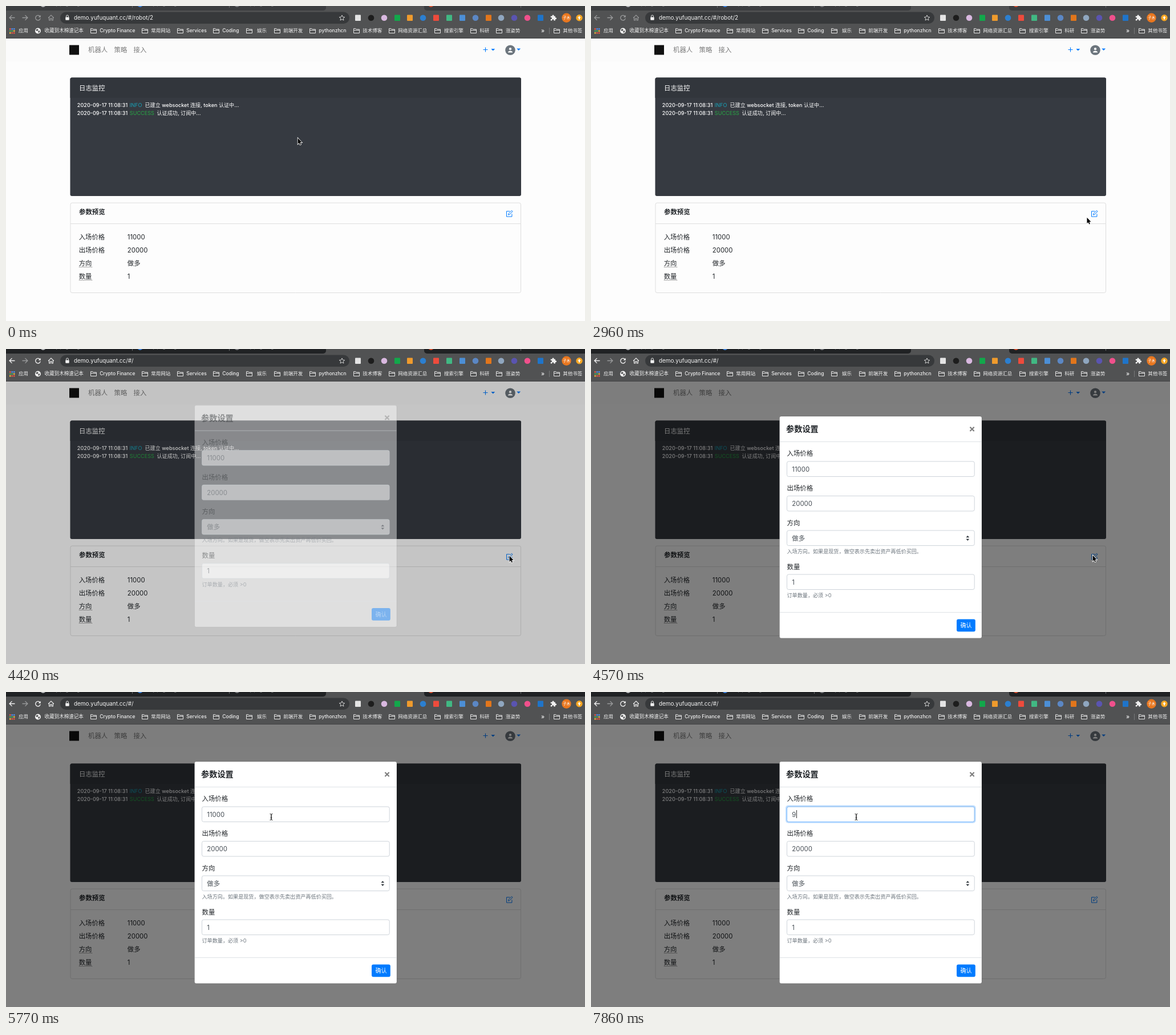
An HTML page with a canvas for the animation above (8000 ms loop, 1015 by 552 pixels).

```html
<!DOCTYPE html>
<html lang="zh-CN">
<head>
<meta charset="utf-8">
<title>Robot settings</title>
<style>
html, body { margin: 0; width: 100%; height: 100%; overflow: hidden; background: #fdfdfd; }
canvas { display: block; }
</style>
</head>
<body>
<canvas id="stage" width="1015" height="552"></canvas>
<script>
const LOOP = 8000, W = 1015, H = 552;
const FONT = 'Inter, "Noto Sans CJK SC", "Noto Sans CJK", sans-serif';
const BLUE = '#007bff', INK = '#212529', PALE = '#f1f1f1';
const ctx = document.getElementById('stage').getContext('2d');

// ---- helpers ----
function text(str, x, cy, size, color, weight = 400, align = 'left') {
  ctx.font = `${weight} ${size}px ${FONT}`;
  ctx.textAlign = align;
  ctx.fillStyle = color;
  ctx.fillText(str, x, cy + size * 0.365);
}
function rect(x, y, w, h, color) {
  ctx.fillStyle = color;
  ctx.fillRect(x, y, w, h);
}
function box(x, y, w, h, r, fill, stroke, width = 1) {
  ctx.beginPath();
  ctx.roundRect(x, y, w, h, r);
  if (fill) { ctx.fillStyle = fill; ctx.fill(); }
  if (stroke) { ctx.strokeStyle = stroke; ctx.lineWidth = width; ctx.stroke(); }
}
function dot(x, y, r, fill, stroke, width = 1) {
  ctx.beginPath();
  ctx.arc(x, y, r, 0, 7);
  if (fill) { ctx.fillStyle = fill; ctx.fill(); }
  if (stroke) { ctx.strokeStyle = stroke; ctx.lineWidth = width; ctx.stroke(); }
}
function line(d, x, y, color, width = 1.3) {
  ctx.save();
  ctx.translate(x, y);
  ctx.strokeStyle = color;
  ctx.lineWidth = width;
  ctx.stroke(new Path2D(d));
  ctx.restore();
}
function shape(d, x, y, color) {
  ctx.save();
  ctx.translate(x, y);
  ctx.fillStyle = color;
  ctx.fill(new Path2D(d));
  ctx.restore();
}

// ---- browser ----
const extensions = [
  [617, 's', '#e4e4e4'], [640, 'c', '#1d1d1d'], [663, 'c', '#d9b8e0'], [686, 's', '#12a84b'],
  [708, 's', '#ef9b2d'], [731, 'c', '#2c7fd0'], [754, 's', '#ee4b3c'], [777, 's', '#41b883'],
  [800, 's', '#4c8fd6'], [823, 'c', '#5b87c4'], [846, 's', '#e2761b'], [868, 'c', '#8fa6bf'],
  [891, 'c', '#5a54b0'], [914, 'c', '#f0508c'], [937, 's', '#1f74c9']
];
const folders = [
  [148, 'Crypto Finance'], [238, '常用网站'], [300, 'Services'], [363, 'Coding'], [421, '娱乐', 440],
  [470, '前端开发'], [532, 'pythonzhcn'], [609, '技术博客'], [671, '网络资源汇总'], [751, '搜索引擎', 768],
  [814, '科研'], [859, '涨姿势', 876], [960, '其他书签']
];

function drawTabs(active) {
  const strip = active ? '#202224' : '#3c3e40';
  rect(0, 0, W, 57, '#515253');
  box(-8, -10, 569, 18, [0, 0, 5, 0], strip);
  box(733, -10, 300, 18, [0, 0, 0, 5], strip);
  for (const x of [221, 391, 902]) rect(x, 0, 1, 3, '#6c6e70');
  dot(65, -3, 5, '#b9bbbd');
  dot(235, -3, 5, '#3b86e8');
  dot(405, -3, 5, '#7b7d80');
  dot(745, -3, 5, '#e0502e');
  for (const x of [80, 250, 420]) text('my page log', x, -4, 8.5, '#8f9193');
}

function drawToolbar(active, url) {
  const on = active ? '#f3f3f3' : '#999a9b';
  line('M5 0H-4.2M0-4.4L-4.4 0L0 4.4', 10.5, 20.5, on);
  line('M-5 0H4.2M0-4.4L4.4 0L0 4.4', 33.5, 20.5, '#999a9b');
  line('M3.6-2.4A4.3 4.3 0 1 0 4.3 0.8', 56, 20.7, on);
  shape('M4.8-5V-1H0.8Z', 56, 20.7, on);
  line('M-5 0.2L0-4.5L5 0.2M-3.4-0.8V4.4H-1.2V1.2H1.2V4.4H3.4V-0.8', 79, 20.6, on, 1.1);

  box(95, 10.5, 507, 20.5, 10.2, '#37393b');
  box(104.3, 19.5, 6.4, 5.3, 0.8, PALE);
  line('M-1.9 0V-1.7A1.9 1.9 0 0 1 1.9-1.7V0', 107.5, 19.6, PALE, 1);
  text(url, 119, 20.8, 9.94, '#f5f5f5', 400);
  line('M0-4.8L1.4-1.6L4.8-1.3L2.2 1L3 4.3L0 2.5L-3 4.3L-2.2 1L-4.8-1.3L-1.4-1.6Z', 589, 20.8, '#dedede', 0.9);

  for (const [x, kind, color] of extensions) {
    if (kind === 's') box(x - 5, 15.5, 10, 10.5, 1, color);
    else dot(x, 20.8, 5.3, color);
  }
  shape('M-4.5-2.8H-1.7A1.6 1.6 0 1 1 1.2-2.8H3.6V0A1.5 1.5 0 1 1 3.6 2.6V5H0.8A1.5 1.5 0 1 0-1.8 5H-4.5V2.2A1.5 1.5 0 1 0-4.5-0.4Z', 959.3, 20.5, PALE);
  dot(982.5, 20.8, 8.2, '#e9771f');
  text('子木', 982.5, 20.8, 6.6, '#fff', 400, 'center');
  dot(1005, 20.8, 5.7, '#f5a623');
  shape('M0-3.2L2.8 0H1V2.8H-1V0H-2.8Z', 1005, 20.8, '#fff');
}

function drawBookmarks() {
  const hues = ['#ea5546', '#f2b53a', '#4aa860', '#4d8df0'];
  for (let i = 0; i < 9; i++) {
    rect(6 + (i % 3) * 3.5, 39 + Math.floor(i / 3) * 3.5, 2.5, 2.5, hues[(i * 3 + (i >> 1)) % 4]);
  }
  text('应用', 22, 43.3, 8.5, PALE);
  dot(56, 43.5, 5, PALE);
  shape('M-4-1.5L-1-3.5L1-1.5L-1 0.3L-2.5 0ZM0.3 0.6L3.4-0.4L3 2.2L0.8 3.6Z', 56, 43.5, '#515253');
  text('收藏到木棉速记本', 67.5, 43.3, 8.55, PALE);
  for (const [x, label, tx] of folders) {
    line('M0.5-4H4L5.2-2.6H10.5V4H0.5ZM0.5-1H10.5', x, 43.5, '#e2e2e2', 1);
    text(label, tx || x + 16.3, 43.3, 8.5, PALE, 500);
  }
  text('»', 938, 43, 10, PALE, 500);
  rect(952, 38, 1, 11, '#77787a');
  rect(0, 56, W, 1, '#434446');
}

// ---- page ----
function caret(x, y) { shape('M-3.4 0H3.4L0 3.5Z', x, y, BLUE); }

function drawPage() {
  rect(0, 57, W, H - 57, '#fdfdfd');
  rect(0, 57, W, 40, '#fbfbfb');
  box(111, 68.5, 17, 17, 0, '#111');
  text('机器人', 144, 77, 11.4, '#7c7c7c');
  text('策略', 189.5, 77, 11.4, '#7c7c7c');
  text('接入', 223.5, 77, 11.4, '#7c7c7c');
  line('M-4 0H4M0-4V4', 840.5, 76.5, BLUE, 1.1);
  caret(853.8, 75);
  dot(884, 77.3, 8.8, '#6c757d');
  dot(884, 75.2, 2.1, '#fff');
  shape('M-4 4.2C-4 0.4 4 0.4 4 4.2Z', 884, 77.2, '#fff');
  caret(898.7, 74.5);

  box(112.5, 125.5, 790.5, 207.5, 3, '#363a41');
  box(112.5, 125.5, 790.5, 35.5, [3, 3, 0, 0], '#32363c');
  text('日志监控', 128, 143.5, 11.4, '#fff', 500);
  logLine(173.7, 'INFO', '#17a2b8', '已建立 websocket 连接, token 认证中...', 243.5);
  logLine(187.3, 'SUCCESS', '#28a745', '认证成功, 订阅中...', 264.5);

  box(113, 345, 789.5, 157.5, 3, '#fdfdfd', '#dedede');
  rect(113, 381, 789, 1, '#dedede');
  text('参数预览', 128, 360.5, 11.4, INK, 600);
  editIcon();
  const rows = [['入场价格', '11000'], ['出场价格', '20000'], ['方向', '做多'], ['数量', '1']];
  rows.forEach(([name, value], i) => {
    const y = 405.3 + i * 22.8;
    text(name, 127.7, y, 11.4, INK);
    text(value, 212.8, y, 11.4, INK);
    if (i > 1) for (let x = 128; x < 151; x += 2) rect(x, Math.round(y + 6), 1, 1, '#555');
  });
}
function logLine(y, level, color, message, x) {
  text('2020-09-17 11:08:31', 124.8, y, 9.1, '#fff', 500);
  text(level, 216.8, y, 9.1, color);
  text(message, x, y, 9.1, '#fff', 500);
}
function editIcon() {
  line('M1-4.6H-4.8V4.8H4.6V0M-1.8 1.8L-1.2-0.8L4.2-6L5.8-4.4L0.6 1Z', 882.3, 364.3, BLUE, 1);
}

// ---- dialog ----
function field(y, value) {
  box(343.5, y, 328.7, 26.5, 3, '#fff', '#ced4da');
  text(value, 352.3, y + 13.4, 11.4, '#495057');
}
function drawDialog(shift, alpha, price, focus, caretOn) {
  ctx.save();
  ctx.globalAlpha = alpha;
  ctx.translate(0, shift);
  box(330.5, 122, 354.5, 388.7, 3, '#fff', 'rgba(0,0,0,.2)', 0.7);
  rect(331, 166, 353.5, 1, '#dee2e6');
  rect(331, 465, 353.5, 1, '#dee2e6');
  text('参数设置', 342, 144, 14.2, INK, 600);
  text('×', 668, 143.5, 17, '#7f7f7f', 700, 'center');

  text('入场价格', 343.5, 187, 11.4, INK);
  if (focus) box(341, 198.4, 333.6, 31.4, 5, `rgba(0,123,255,${0.25 * focus})`);
  field(201, price);
  if (focus) {
    ctx.globalAlpha = focus;
    box(343.5, 201, 328.7, 26.5, 3, null, '#80bdff');
    ctx.globalAlpha = alpha;
  }
  if (caretOn) {
    ctx.font = `400 11.4px ${FONT}`;
    rect(Math.round(352.6 + ctx.measureText(price).width), 207, 1, 14, '#333');
  }

  text('出场价格', 343.5, 247.8, 11.4, INK);
  field(261.5, '20000');
  text('方向', 343.5, 308.5, 11.4, INK);
  field(322, '做多');
  shape('M-2.9-1.2L0-4.4L2.9-1.2ZM-2.9 1.2L0 4.4L2.9 1.2Z', 660.3, 335.5, '#343a40');
  text('入场方向。如果是现货，做空表示先卖出资产再低价买回。', 343.5, 358.5, 9.1, '#6c757d');
  text('数量', 343.5, 385.5, 11.4, INK);
  field(399, '1');
  text('订单数量，必须 >0', 343.5, 435.6, 9.1, '#6c757d');
  box(641, 477.5, 32.8, 21.7, 3, BLUE);
  text('确认', 657.4, 488.5, 10, '#fff', 400, 'center');
  ctx.restore();
}

// ---- pointer: [start, end, hops, x, y] ----
const moves = [
  [300, 1030, 6, 419, 391], [1480, 1480, 1, 423, 391], [1630, 1630, 1, 610, 418],
  [1770, 1770, 1, 798, 409], [2070, 3110, 8, 882, 363], [4270, 4270, 1, 882, 362],
  [4570, 4570, 1, 879, 361], [4720, 4720, 1, 826, 358], [4870, 4870, 1, 680, 322],
  [5020, 5020, 1, 523, 294], [5320, 5620, 3, 465, 222], [5770, 5770, 1, 465, 219]
];
function pointerAt(t) {
  let x = 511, y = 231;
  for (const [start, end, hops, tx, ty] of moves) {
    if (t < start) break;
    const hop = t >= end ? hops : 1 + Math.floor((t - start) / (end - start) * (hops - 1));
    const k = hop / hops, p = k * k * (3 - 2 * k);
    x += (tx - x) * p;
    y += (ty - y) * p;
  }
  return [x, y];
}
function drawPointer(t) {
  const [x, y] = pointerAt(t);
  if (t >= 5620) {
    const beam = 'M-2.4-5.5Q0-5.5 0-4V4Q0 5.5-2.4 5.5M2.4-5.5Q0-5.5 0-4V4Q0 5.5 2.4 5.5M-1.3 1.4H1.3';
    line(beam, x, y, '#fff', 2.2);
    line(beam, x, y, '#222', 1);
    return;
  }
  const arrow = 'M0.6 0.6V10.9L2.9 8.8L4.4 12.2L6 11.5L4.5 8.1H7.6Z';
  line(arrow, x, y, '#fff', 1.6);
  shape(arrow, x, y, '#000');
}

// ---- timeline ----
function easeOut(x) {
  let u = x;
  for (let i = 0; i < 8; i++) {
    const f = 1.74 * u * u * (1 - u) + u * u * u - x;
    u -= f / (3.48 * u - 2.22 * u * u + 0.01);
  }
  return 3 * u * u * (1 - u) + u * u * u;
}
function priceAt(t) {
  if (t >= 7860) return '9';
  const erased = t < 6670 ? 0 : Math.floor((t - 6670) / 150) + 1;
  return '11000'.slice(0, Math.max(0, 5 - erased));
}

function draw(t) {
  const active = t >= 3240, open = t >= 4420;
  ctx.clearRect(0, 0, W, H);
  drawTabs(active);
  drawToolbar(active, 'demo.yufuquant.cc/#/' + (open ? '' : 'robot/2'));
  drawBookmarks();
  drawPage();
  if ((t >= 3240 && t < 3370) || (t >= 4120 && t < 4420)) dot(883.3, 362.3, 7.2, null, '#24384c', 1.1);
  if (open) {
    // the screen refreshes every 150 ms; the dialog opened shortly before the first refresh
    const age = 67 + Math.floor((t - 4420) / 150) * 150;
    const fade = Math.min(1, age / 150);
    rect(0, 57, W, H - 57, `rgba(0,0,0,${fade * 0.5})`);
    const shift = age >= 300 ? 0 : -35.5 * (1 - easeOut(age / 300));
    const focus = t < 5920 ? 0 : t < 6070 ? 0.6 : 1;
    const caretOn = focus && (t < 6370 || t >= 6670);
    drawDialog(shift, fade, priceAt(t), focus, caretOn);
  }
  drawPointer(t);
}

const began = performance.now();
function tick() {
  draw((performance.now() - began) % LOOP);
  requestAnimationFrame(tick);
}
tick();
</script>
</body>
</html>
```
